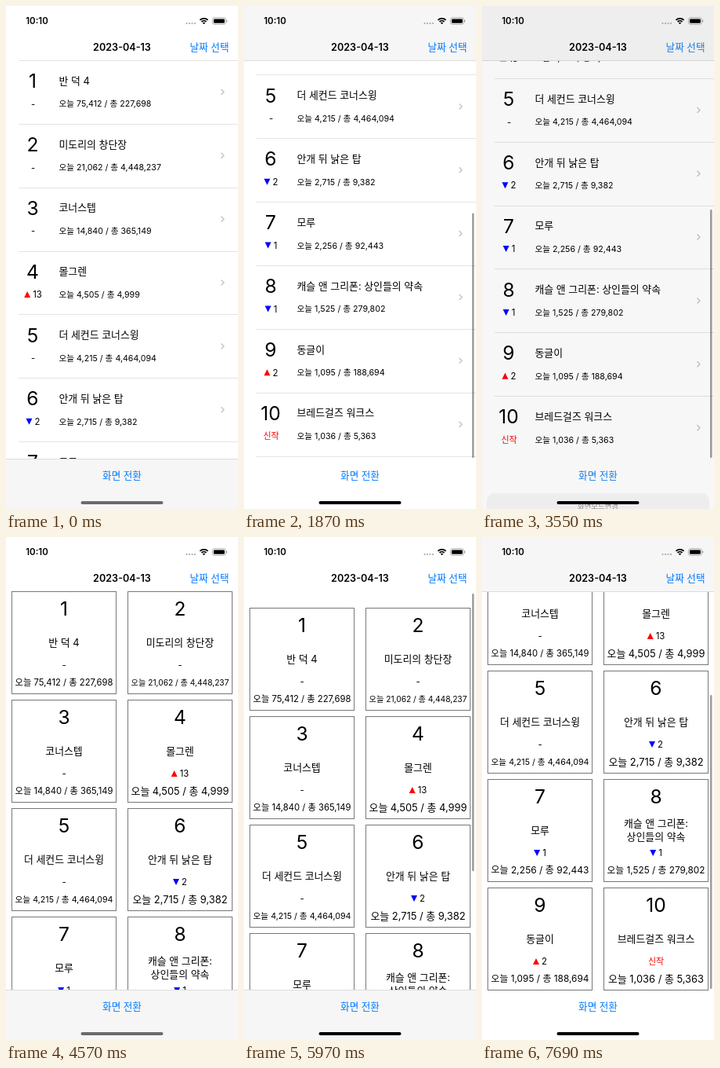
Animation, 296 px wide and 640 px high, one loop 7.71 s. Source, as an HTML page with a canvas:

```html
<!DOCTYPE html>
<html lang="ko">
<head>
<meta charset="utf-8">
<title>박스오피스</title>
<style>
html, body { margin: 0; width: 100%; height: 100%; overflow: hidden; background: #fff; }
canvas { display: block; width: 296px; height: 640px; }
</style>
</head>
<body>
<canvas id="stage"></canvas>
<script>
const W = 296, H = 640, LOOP = 7710;
const TOP = 69, BOTTOM = 577, VIEW = BOTTOM - TOP;
const ROW = 80.85, CELL = 138, BOX = 130;
const LIST_MAX = ROW * 10 - VIEW, GRID_MAX = CELL * 4 + BOX + 1 - VIEW;
const SWITCH = 3600;
const RED = '#f00', BLUE = '#00f', GRAY_BAR = '#f6f6f6', HAIRLINE = '#dcdcdc';
const FAMILY = 'Inter, "Noto Sans CJK KR", "Noto Sans CJK JP", sans-serif';

// title, rank change, today, total
const movies = [
  ['반 덕 4', 0, 75412, 227698],
  ['미도리의 창단장', 0, 21062, 4448237],
  ['코너스텝', 0, 14840, 365149],
  ['몰그렌', 13, 4505, 4999],
  ['더 세컨드 코너스윙', 0, 4215, 4464094],
  ['안개 뒤 낡은 탑', -2, 2715, 9382],
  ['모루', -1, 2256, 92443],
  ['캐슬 앤 그리폰: 상인들의 약속', -1, 1525, 279802],
  ['동글이', 2, 1095, 188694],
  ['브레드걸즈 워크스', 'new', 1036, 5363],
].map(([title, change, today, total]) => ({
  title, change,
  audience: `오늘 ${today.toLocaleString('en-US')} / 총 ${total.toLocaleString('en-US')}`,
}));

const bursts = [
  [1110, 1870, 8], [1990, 2100, 2], [2320, 2880, 6], [3090, 3800, 7], [3910, 3910, 1],
  [4570, 5320, 8], [5430, 6180, 8], [6300, 6630, 4], [6780, 7470, 7], [7590, 7690, 2],
];
const listScroll = [[1110, 0], [1220, 38], [1330, 130], [1440, 232], [1550, 300], [1660, 323],
  [1770, 314], [1870, 305], [1990, 302], [2100, LIST_MAX]];
const gridScroll = [[4570, 0], [4680, 30], [4790, 100], [4900, 172], [5000, 208], [5110, 214],
  [5215, 203], [5320, 193], [5430, 184], [5540, 170], [5650, 128], [5760, 68], [5860, 10],
  [5970, -22], [6080, -24], [6180, -14], [6300, -7], [6520, -1], [6630, 0],
  [6779, 0], [6780, 11.5], [6895, 60], [7010, 130], [7125, 184], [7240, 206], [7355, 200],
  [7470, 186], [7590, 178], [7690, GRID_MAX]];
const sheetRise = [[2320, 0], [2430, .3], [2545, .75], [2655, .93], [2768, .98], [2880, 1],
  [3200, 1], [3330, .6], [3445, .15], [3563, 0]];
const barFade = [[1110, 0], [1111, 1], [SWITCH, 1], [3910, 0], [4570, 0], [4571, 1]];

const canvas = document.getElementById('stage');
const ctx = canvas.getContext('2d');
const scale = window.devicePixelRatio || 1;
canvas.width = W * scale;
canvas.height = H * scale;

function track(keys, t) {
  const next = keys.findIndex(key => key[0] > t);
  if (next === 0) return keys[0][1];
  if (next < 0) return keys[keys.length - 1][1];
  const [t0, v0] = keys[next - 1], [t1, v1] = keys[next];
  return v0 + (v1 - v0) * (t - t0) / (t1 - t0);
}

function snap(t) {
  let shown = 0;
  for (const [start, end, count] of bursts) {
    if (t < start) break;
    const gap = (end - start) / Math.max(count - 1, 1);
    shown = gap ? start + gap * Math.min(count - 1, Math.floor((t - start) / gap + 1e-6)) : start;
  }
  return shown;
}

function setFont(size, weight = 400) {
  ctx.font = `${weight} ${size}px ${FAMILY}`;
}

// Draws text vertically centred on y.
function text(str, x, y, size, { color = '#000', align = 'center', weight = 400 } = {}) {
  setFont(size, weight);
  ctx.textAlign = align;
  ctx.fillStyle = color;
  ctx.fillText(str, x, y + size * .37);
}

function rect(x, y, w, h, color, radius = 0) {
  ctx.fillStyle = color;
  ctx.beginPath();
  ctx.roundRect(x, y, w, h, radius);
  ctx.fill();
}

function trend(change, x, y) {
  if (change === 'new') return text('신작', x, y, 11, { color: RED });
  if (!change) return text('-', x, y, 11.4);
  const label = String(Math.abs(change)), size = 11.4;
  setFont(size);
  const left = x - (11 + ctx.measureText(label).width) / 2;
  const tip = change > 0 ? -4 : 4;
  ctx.fillStyle = change > 0 ? RED : BLUE;
  ctx.beginPath();
  ctx.moveTo(left, y - tip);
  ctx.lineTo(left + 8, y - tip);
  ctx.lineTo(left + 4, y + tip);
  ctx.fill();
  text(label, left + 11, y, size, { align: 'left' });
}

function drawList(offset) {
  const left = { align: 'left' };
  movies.forEach((movie, i) => {
    const y = TOP + i * ROW - offset;
    rect(16, Math.round(y), W - 16, 1, '#e4e4e4');
    text(i + 1, 34, y + 26, 24.6);
    trend(movie.change, 34.5, y + 55.5);
    text(movie.title, 67.5, y + 26, 12.9, left);
    text(movie.audience, 67.5, y + 55.5, 10.65, left);
    ctx.strokeStyle = '#c4c4c6';
    ctx.lineWidth = 1.4;
    ctx.beginPath();
    ctx.moveTo(274.5, y + 37);
    ctx.lineTo(278, y + 40.5);
    ctx.lineTo(274.5, y + 44);
    ctx.stroke();
  });
  rect(16, Math.round(TOP + 10 * ROW - offset), W - 16, 1, '#e4e4e4');
}

function drawGrid(offset) {
  movies.forEach((movie, i) => {
    const x = i % 2 ? 155.5 : 7.5, mid = x + 66.5;
    const y = Math.round(TOP + Math.floor(i / 2) * CELL - offset);
    ctx.strokeStyle = '#777';
    ctx.lineWidth = 1;
    ctx.strokeRect(x, y + .5, 133, BOX);
    text(i + 1, mid, y + 22, 24.6);
    const lines = movie.title.split(/(?<=:) /);
    lines.forEach((line, n) => text(line, mid, y + 65 + (n - (lines.length - 1) / 2) * 17, 12.9));
    trend(movie.change, mid, y + 94);
    setFont(12.9);
    const fit = Math.min(1, 125 / ctx.measureText(movie.audience).width);
    text(movie.audience, mid, y + 116, 12.9 * fit);
  });
}

function drawScrollBar(offset, max, alpha) {
  const full = 503 * VIEW / (VIEW + max);
  const inside = Math.min(max, Math.max(0, offset));
  const length = full - Math.abs(offset - inside);
  const top = offset > max ? 575 - length : 72 + (503 - full) * inside / max;
  rect(291, top, 2.5, length, `rgba(0,0,0,${.38 * alpha})`, 1.25);
}

function drawStatusIcons() {
  for (let i = 0; i < 4; i++) rect(229.4 + i * 3.5, 21, 2.2, 2.2, '#aaa', 1.1);
  ctx.strokeStyle = '#000';
  ctx.lineWidth = 1.7;
  for (const r of [4.2, 7.2]) {
    ctx.beginPath();
    ctx.arc(252.5, 23, r, -Math.PI * .75, -Math.PI * .25);
    ctx.stroke();
  }
  ctx.fillStyle = '#000';
  ctx.beginPath();
  ctx.moveTo(252.5, 23.3);
  ctx.arc(252.5, 23.3, 2.4, -Math.PI * .75, -Math.PI * .25);
  ctx.fill();
  ctx.strokeStyle = '#999';
  ctx.lineWidth = .8;
  ctx.beginPath();
  ctx.roundRect(263.4, 14.9, 17, 8.4, 2.6);
  ctx.stroke();
  rect(264.9, 16.4, 14, 5.4, '#000', 1.4);
  rect(281.2, 17.6, 1, 3, '#999', .5);
}

function drawSheet(rise, pressed) {
  const shift = (1 - rise) * 155;
  ctx.save();
  ctx.translate(0, shift);
  rect(6, 488, 284, 76.5, '#ededed', 10);
  if (pressed) rect(6, 521, 284, 43.5, '#dedede', [0, 0, 10, 10]);
  rect(6, 521, 284, 1, '#d4d4d4');
  text('화면모드변경', 148, 505, 9.4, { color: '#8a8a8a' });
  text('아이콘', 148, 543, 14.5, { color: '#007aff' });
  rect(6, 571, 284, 43.5, '#fff', 10);
  text('취소', 148, 592.5, 14.9, { color: '#007aff', weight: 600 });
  ctx.restore();
}

function draw(t) {
  const isList = t < SWITCH;
  const offset = track(isList ? listScroll : gridScroll, t);
  const max = isList ? LIST_MAX : GRID_MAX;
  const rise = track(sheetRise, t);
  const tint = `hsl(211, ${100 * (1 - rise)}%, ${50 + 10 * rise}%)`;

  ctx.setTransform(scale, 0, 0, scale, 0, 0);
  rect(0, 0, W, H, '#fff');
  (isList ? drawList : drawGrid)(offset);
  drawScrollBar(offset, max, track(barFade, t));

  const scrolled = offset > .5, more = offset < max - .5;
  rect(0, 0, W, TOP, scrolled ? GRAY_BAR : '#fff');
  if (scrolled) rect(0, TOP, W, 1, HAIRLINE);
  rect(0, BOTTOM, W, H - BOTTOM, more ? GRAY_BAR : '#fff');
  if (more) rect(0, BOTTOM - 1, W, 1, HAIRLINE);

  text('2023-04-13', 148, 52, 12.6, { weight: 600 });
  text('날짜 선택', 284.5, 52, 12.6, { color: tint, align: 'right' });
  ctx.globalAlpha = t >= 2320 && t < 2430 ? .3 : 1;
  text('화면 전환', 148, 597.5, 12.6, { color: tint });
  ctx.globalAlpha = 1;

  if (rise > 0) {
    rect(0, 0, W, H, `rgba(0,0,0,${.2 * rise})`);
    drawSheet(rise, t >= 3090 && t < 3300);
  }
  text('10:10', 39.5, 19, 11.5, { weight: 600 });
  drawStatusIcons();
  const resting = t < 1110 || (t >= SWITCH && t <= 4570);
  rect(95.5, 630, 105, 4, resting ? '#6b6b6b' : '#000', 2);
}

const began = performance.now();
function tick() {
  draw(snap((performance.now() - began) % LOOP));
  requestAnimationFrame(tick);
}
tick();
</script>
</body>
</html>
```
